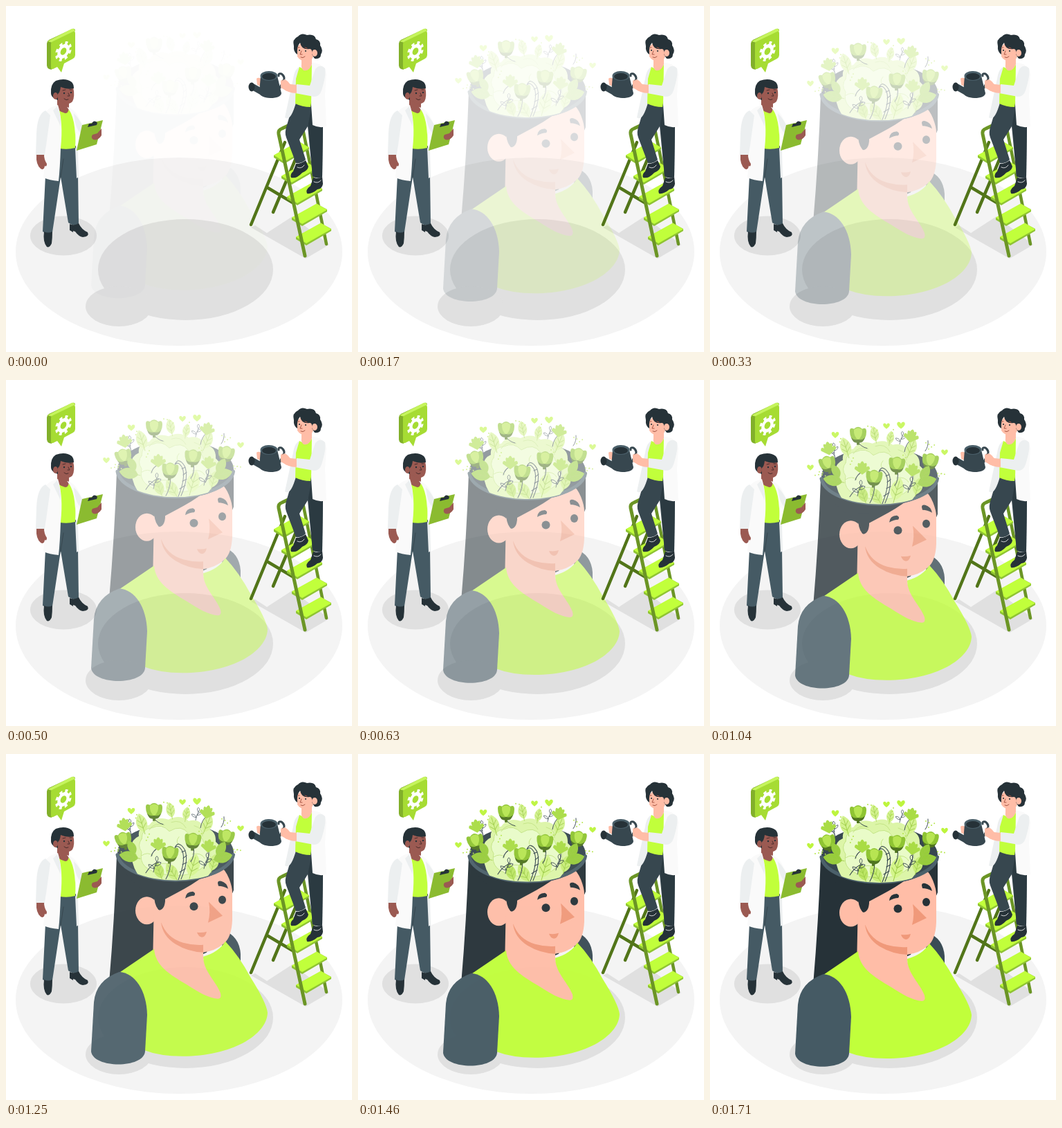
An HTML page for the animation above (1.75 s loop, 500x500 px).

```html
<!DOCTYPE html>
<html lang="en">
<head>
<meta charset="utf-8">
<title>Growing ideas</title>
<style>
html, body { margin: 0; width: 100%; height: 100%; overflow: hidden; background: #fff }
svg { display: block; width: 100vw; height: 100vh }
.ink { fill: #263238 }
.slate { fill: #455a64 }
.lime { fill: #c1ff3b }
.skin { fill: #ffbda7 }
.blush { fill: #f0997a }
.brown { fill: #9b5a52 }
.coat { fill: #fafafa }
.fold { fill: #eceff0 }
.shade { fill: #e0e0e0 }
.line { fill: none; stroke-linecap: round; stroke-linejoin: round }
</style>
</head>
<body>
<svg viewBox="0 0 500 500">
<defs>
  <g id="tulip">
    <path d="M-12-6Q-12-12-6-9Q0-15 6-9Q12-12 12-5Q12 6 4 9H-4Q-12 6-12-6Z" fill="#8fc433"/>
    <path d="M-6-8Q0-13 6-8Q7 1 0 7Q-7 1-6-8Z" fill="#b7e552"/>
    <path d="M-10 3Q-6 8 0 6Q6 8 10 3Q8 11 2 11V14H-2V11Q-8 11-10 3Z" fill="#4f7420"/>
  </g>
  <path id="fan" d="M0 10L-11 2Q-11-4-6-1Q-8-9-3-6Q0-13 3-6Q8-9 6-1Q11-4 11 2Z" fill="#a9dc45"/>
  <path id="heart" d="M0 4Q-7-1-4-4Q-1-5 0-2Q1-5 4-4Q7-1 0 4Z" fill="#bdf53d"/>
  <g id="leaf">
    <path d="M0 0C-11-7-10-20 0-28C10-20 11-7 0 0Z"/>
    <path class="line" d="M0 3V-24M0-6L-6-12M0-6L6-12M0-13L-5-19M0-13L5-19" stroke="#9ccc44" stroke-width=".8"/>
  </g>
  <g id="sprig" class="line" stroke="#37474f" stroke-width=".9">
    <path d="M0 0Q1-8 5-15M1-5Q-7-6-7-11Q0-11 1-5M3-9Q10-9 11-14Q5-15 3-9M5-15Q1-20 5-23Q9-20 5-15"/>
  </g>
  <g id="step">
    <path d="M419 334L455 314L470 322V325L434 346L419 337Z" fill="#8fc433"/>
    <path class="lime" d="M419 333.500L455 313.500L470 322.500L434 343Z"/>
  </g>
  <clipPath id="bowl"><path d="M100 30H400V149H328A83 37 0 0 1 162 149H100Z"/></clipPath>
</defs>

<!-- floor -->
<ellipse cx="250" cy="355" rx="236" ry="136" fill="#f4f4f4"/>
<g class="shade">
  <ellipse cx="259.500" cy="381" rx="126.500" ry="73"/>
  <ellipse cx="163" cy="434" rx="48" ry="29"/>
  <ellipse cx="83" cy="332" rx="48" ry="28.500"/>
  <path d="M354 320L360 317L377 328L414 304L467 345L433 365Z"/>
</g>

<!-- bust -->
<g id="bust">
  <path d="M314 258Q337 266 339 292V307H310Z" fill="#3a4c55"/>
  <path class="ink" d="M160 149Q157 240 149 334L180 340L290 290L329 200V149Q240 70 160 149Z"/>
  <path class="skin" d="M214 212L232 208L306 163Q327 172 327 205V243Q326 268 315 277Q302 288 285 290V300L313 350V361H295L212 310Z"/>
  <path class="blush" d="M224 246Q232 269 256 276Q270 280 285 279V290Q263 289 245 278Q226 266 224 246Z"/>
  <path class="lime" d="M214 285C216 309 235 321 262 337C278 347 292 356 306 357Q312 357 310 349C304 332 285 317 285 296Q307 290 317 274Q337 295 354 327Q376 362 378 377C377 410 325 440 255 440Q222 440 199 431L164 319Z"/>
  <path class="slate" d="M164 318C186 320 203 344 204 380L201 433C199 458 126 458 123 433L127 362Q130 330 164 318Z"/>
  <path class="ink" d="M160 149Q166 180 214 212L220 229Q229 226 230 213C253 201 282 186 306 163Q322 171 328 204L329 149Z"/>
  <ellipse class="skin" cx="203.500" cy="229.500" rx="16.500" ry="20"/>
  <path class="skin" d="M213 220L222 230L230 217V247H214Z"/>
  <path class="ink" d="M214 200L230 200V213Q230 227 222 229Q216 226 214 211Z"/>
  <path class="blush" d="M293 217L313 237L292 247Q296 232 293 217ZM276 261Q284 262 290 260Q288 268 283 268Q278 267 276 261Z"/>
  <g class="ink">
    <ellipse cx="271.500" cy="223.500" rx="6" ry="6"/>
    <ellipse cx="312.500" cy="214" rx="5.500" ry="6"/>
    <path d="M259 212Q260 202 270 202Q275 204 272 208Q266 208 259 212ZM306 190Q306 186 311 187Q319 189 321 198Q314 194 307 194Z"/>
  </g>
  <ellipse cx="245" cy="146" rx="84" ry="42" fill="#37474f"/>
  <path class="line" d="M161 149A84 39 0 0 0 328.500 149" stroke="#4b606a" stroke-width="5"/>

  <!-- garden -->
  <g clip-path="url(#bowl)">
    <path d="M182 145Q178 128 192 122Q190 108 207 106Q217 92 235 98Q251 90 264 100Q281 96 286 110Q304 112 303 130Q318 143 307 160L280 195H205Q179 170 182 145Z" fill="#dcf5a8"/>
    <g class="line" stroke="#c3e485" stroke-width="1">
      <path d="M196 126Q196 111 211 110Q225 103 236 115Q254 104 264 119Q283 117 286 132Q301 142 292 160Q270 185 228 177Q190 171 196 145Q189 135 196 126Z" fill="#e9fbc8"/>
      <path d="M207 113Q214 101 229 106M239 102Q253 97 260 110M272 107Q286 111 284 122M196 150Q205 144 212 150M250 123Q243 131 252 136M269 148Q282 145 287 154M222 163Q231 158 239 167"/>
    </g>
    <use href="#leaf" transform="translate(247 185) rotate(-32)" fill="#c9ee7b"/>
    <use href="#leaf" transform="translate(266 180) rotate(16) scale(1.2)" fill="#d4f58b"/>
    <use href="#leaf" transform="translate(225 183) rotate(-20) scale(.9)" fill="#bce664"/>
    <use href="#leaf" transform="translate(297 172) rotate(15) scale(.9)" fill="#c9ee7b"/>
    <g class="line" stroke="#37474f" stroke-width="1.100">
      <path d="M249 185Q260 158 255 144Q249 133 244 139M253 184Q265 156 258 141Q249 127 244 139"/>
      <path d="M251 174L259 169M255 163L261 160M256 154L261 150M254 145L259 143"/>
      <path d="M238 158Q237 174 231 184M271 137Q273 151 267 159M220 139Q212 143 210 151M293 142Q294 154 288 165M202 175Q210 162 221 159"/>
    </g>
    <use href="#sprig" x="213" y="174"/>
    <use href="#sprig" x="286" y="169"/>
  </g>
  <g fill="#d3f28f">
    <use href="#leaf" transform="translate(200 116) rotate(-17)"/>
    <use href="#leaf" transform="translate(286 116) rotate(23) scale(.95)"/>
    <use href="#leaf" transform="translate(259 99) rotate(10) scale(.7)"/>
    <use href="#leaf" transform="translate(240 95) rotate(-12) scale(.8)"/>
  </g>
  <g class="line" stroke="#37474f" stroke-width="1">
    <path d="M213 95Q218 103 227 105M291 92Q283 98 281 110M171 108Q180 112 181 119M170 137Q181 140 184 151M317 132Q309 139 303 152M311 109Q316 102 315 94"/>
  </g>
  <use href="#sprig" transform="translate(180 116) rotate(-18) scale(.8)"/>
  <use href="#sprig" transform="translate(274 99) scale(.8)"/>
  <use href="#tulip" x="214" y="86"/>
  <use href="#tulip" transform="translate(170 128) rotate(-14)"/>
  <use href="#tulip" transform="translate(237 148) rotate(5)"/>
  <use href="#tulip" transform="translate(270 129) rotate(4)"/>
  <use href="#tulip" transform="translate(318 124) rotate(9)"/>
  <use href="#fan" transform="translate(171 105) rotate(-9)"/>
  <use href="#fan" transform="translate(291 87) rotate(12)"/>
  <use href="#fan" x="220" y="133"/>
  <use href="#fan" transform="translate(293 136) rotate(8)"/>
  <g fill="#97cd3b">
    <use href="#leaf" transform="translate(191 154) rotate(-79)"/>
    <use href="#leaf" transform="translate(187 147) rotate(-30) scale(.75)"/>
    <use href="#leaf" transform="translate(300 156) rotate(76)"/>
    <use href="#leaf" transform="translate(305 151) rotate(29) scale(.85)"/>
  </g>
  <use href="#heart" transform="translate(181 86) scale(1.100)"/>
  <use href="#heart" x="255" y="73"/>
  <use href="#heart" transform="translate(276 72) scale(1.200)"/>
  <use href="#heart" x="145" y="133"/>
  <use href="#heart" x="339" y="111"/>
  <path class="line" d="M228 73Q237 74 243 80M265 78L262 89M189 91L187 98M152 144Q163 141 170 147M158 139L167 142M312 97L320 101M316 106L326 99M329 141L342 143M331 145L337 139M207 119L201 132M279 115L284 120" stroke="#b5e64b" stroke-width="2" stroke-dasharray="0 5"/>
</g>

<!-- speech bubble -->
<path d="M59 54Q59 51 62 49L96 33Q100 32 100 36L66 54V92L62 91Q59 89 59 86Z" fill="#82b02a"/>
<path d="M60 51L95 33Q99 32 100 36L67 53Z" fill="#c5f45c"/>
<path d="M65 55Q65 52 68 51L97 37Q100 36 100 39V71Q100 74 97 76L84 83L80 96L74 88L68 91Q65 92 65 89Z" fill="#a6dc33"/>
<g transform="translate(83 65.500) skewY(-23) scale(.88 1)" fill="none" stroke="#fff">
  <circle r="7.500" stroke-width="5"/>
  <circle r="11" stroke-width="5" stroke-dasharray="4.320" transform="rotate(12)"/>
</g>

<!-- clipboard holder -->
<g>
  <path class="slate" d="M57 245L53 326Q60 330 67 327L79 247L90 313Q98 319 105 315L104 244L101 202H77Z"/>
  <path d="M79 248L83 221" class="line" stroke="#37474f"/>
  <path class="ink" d="M55 326Q61 329 67 326Q67 335 66 343Q63 350 59 348Q53 341 55 326ZM92 315Q99 318 105 314Q109 323 118 327Q121 333 111 334Q105 333 100 326L97 325V327L92 324Z"/>
  <path class="lime" d="M74 148Q84 156 93 149L102 166L100 205Q89 208 78 206Z"/>
  <path class="brown" d="M74 132H91V145Q91 158 83 154Q75 152 74 145Z"/>
  <path class="coat" d="M75 143Q83 168 79 205Q78 235 76 253Q63 252 54 248L58 204L57 153Q65 145 75 143Z"/>
  <path class="fold" d="M57 151Q45 156 44 185L43 215Q49 219 56 216L60 187L64 158ZM74 145L68 151L79 174Q80 157 74 145ZM100 205L102 249L105 247L104 208Z"/>
  <path class="coat" d="M88 146Q98 148 104 159L114 179L107 190L101 182L100 207Q102 160 88 146Z"/>
  <path class="fold" d="M98 155Q107 164 113 178L108 184Q100 177 98 155Z"/>
  <path class="brown" d="M44 215H55Q55 222 59 228Q59 233 56 231Q55 238 50 235Q43 229 44 215Z"/>
  <path d="M110 172L140 165L131 200L102 209Z" fill="#8bbb30"/>
  <path class="ink" d="M118 175L120 170L124 170Q126 165 130 167L132 169L131 172Z"/>
  <path class="brown" d="M138 177V187Q133 195 126 193Q122 190 125 186L132 184Z"/>
  <path class="brown" d="M73 118Q85 108 97 117Q100 131 96 138Q92 143 83 140L73 135Z"/>
  <path class="ink" d="M65 126Q64 113 72 108Q86 103 95 110Q98 113 98 119Q88 121 79 117Q78 125 75 127V136L69 133Q65 130 65 126Z"/>
  <ellipse class="brown" cx="71.500" cy="130" rx="3.500" ry="5"/>
  <circle class="ink" cx="84" cy="126" r="1.200"/><circle class="ink" cx="94" cy="125" r="1.200"/>
  <path class="line" d="M82 122L86 121M92 121L95 121M84 134Q87 137 90 135M90 126L92 130H89" stroke="#4a2c2c" stroke-width="1"/>
</g>

<!-- ladder -->
<g class="line" stroke="#527519" stroke-width="4.500">
  <path d="M403 197L354 316M424 208L386 298M377 262L414 284"/>
  <path d="M429 178L463 344" stroke="#6b9525"/>
</g>
<use href="#step" x="-32" y="-118"/>
<use href="#step" x="-21" y="-88"/>
<use href="#step" x="-13" y="-58"/>
<use href="#step" x="-6" y="-28"/>
<use href="#step"/>
<path class="line" d="M432 361L394 185Q393 179 399 177L420 167Q427 165 429 178" stroke="#6b9525" stroke-width="5"/>

<!-- gardener -->
<g>
  <path class="skin" d="M362 105Q365 102 370 106V117L363 114Z"/>
  <path d="M416 138H442L458 172L457 247Q450 250 443 246L436 174L424 193L433 222Q428 228 419 227L405 190Q402 183 406 172Z" fill="#37474f"/>
  <path d="M442 142L458 172L457 247Q450 250 443 246L437 170Z" fill="#2b3a41"/>
  <path class="ink" d="M419 228Q427 228 433 223L437 232Q436 238 428 241Q420 250 412 248Q410 243 415 239ZM444 248Q451 250 457 247L458 257Q457 264 450 265Q442 272 435 271Q432 266 440 260Z"/>
  <path class="line" d="M421 233Q427 236 431 230M445 254Q451 257 455 252" stroke="#fff" stroke-width=".8"/>
  <path class="fold" d="M424 88Q417 91 415 105L403 161Q411 168 419 140Z"/>
  <path class="lime" d="M424 88Q432 94 441 83L447 105L440 146Q428 146 418 141L419 105Z"/>
  <path class="coat" d="M442 82Q459 82 463 98L461 129L463 174Q453 177 443 172L441 143Z"/>
  <path class="fold" d="M447 91Q454 83 461 90Q463 100 456 122Q453 131 445 131L418 126L420 113L439 115Z"/>
  <path class="skin" d="M420 114V126Q407 126 399 118L397 108Q400 105 404 108L411 113Z"/>
  <path class="skin" d="M427 75H442V84Q438 95 430 93Q426 90 427 84Z"/>
  <g class="line" stroke="#37474f">
    <path d="M394 101Q393 97 398 98Q405 103 400 110L396 118" stroke-width="3"/>
    <path d="M373 126L357 117" stroke-width="9"/>
  </g>
  <path d="M368 101H392L398 126Q397 133 382 133Q367 132 366 125Z" fill="#37474f"/>
  <ellipse cx="380" cy="101" rx="12.500" ry="7" fill="#4b606a"/>
  <ellipse class="ink" cx="380" cy="102" rx="10" ry="5"/>
  <ellipse class="ink" cx="355" cy="117" rx="4.500" ry="6.500"/>
  <path class="skin" d="M397 110L402 106Q408 108 410 113L406 123L397 118Z"/>
  <path class="skin" d="M421 60Q424 51 439 53L446 66Q445 78 435 80Q425 80 421 73Z"/>
  <path class="ink" d="M421 70Q415 66 416 58Q413 48 422 44Q427 38 435 42Q446 40 448 48Q455 50 454 57Q459 64 455 70Q455 77 446 76L442 70Q443 62 439 62Q427 64 425 53Q420 58 421 70Z"/>
  <ellipse class="skin" cx="446" cy="68" rx="4" ry="5"/>
  <circle class="ink" cx="424" cy="64" r="1.100"/><circle class="ink" cx="433" cy="65" r="1.100"/>
  <path class="line" d="M422 60L424 60M432 60L435 61M427 65L425 70H428M426 74Q429 76 432 73" stroke="#a95745"/>
</g>
</svg>
<script>
const LOOP = 1750, DROP = 30, LEAD = 18;
const bust = document.getElementById('bust');

// cubic-bezier(0, 0, .58, 1), solved for its parameter by bisection
function easeOut(x) {
  let low = 0, high = 1;
  for (let i = 0; i < 24; i++) {
    const s = (low + high) / 2;
    if (1.74 * s * s - 0.74 * s ** 3 < x) low = s; else high = s;
  }
  return low * low * (3 - 2 * low);
}

function draw() {
  const time = performance.now() % LOOP;
  const p = easeOut(Math.min(1, (time + LEAD) / LOOP));
  bust.setAttribute('opacity', p);
  bust.setAttribute('transform', `translate(0 ${-DROP * (1 - p)})`);
  requestAnimationFrame(draw);
}
draw();
</script>
</body>
</html>
```
